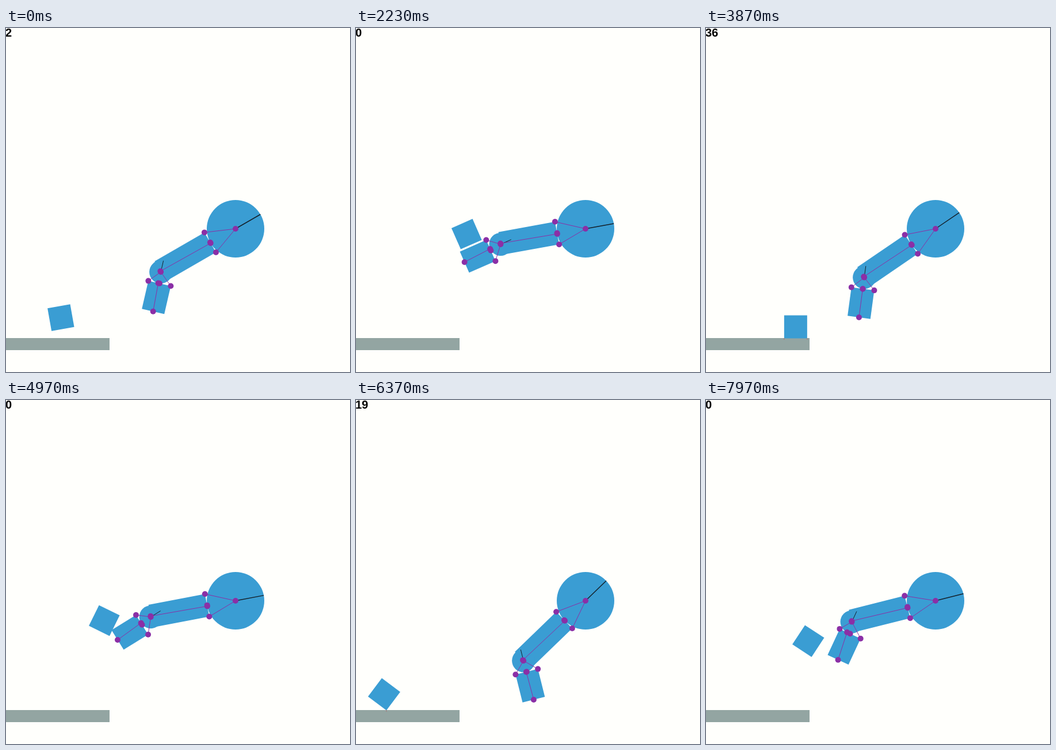
An HTML page with a canvas for the animation above (8 s loop, 598 by 598 pixels).

```html
<!DOCTYPE html>
<html lang="en">
<head>
<meta charset="utf-8">
<title>Two-link arm and cube</title>
<style>
  html, body { margin: 0; width: 100%; height: 100%; overflow: hidden; background: #fffffc; }
  canvas { display: block; }
</style>
</head>
<body>
<canvas id="stage" width="598" height="598"></canvas>
<script>
const ctx = document.getElementById('stage').getContext('2d');
const LOOP = 8000, FLOOR = 539, SHOULDER = { x: 399, y: 349 };
const GRAVITY = 1200, SLIDE = 450, TICK = 1000 / 30;
const BLUE = '#3a9dd3', PURPLE = '#8b2fa6', DARK = '#14202a';
const rad = degrees => degrees * Math.PI / 180;
const mix = (a, b, u) => a + (b - a) * u;

// Each round the arm droops from level, the cube slips off it, lands, may hop, and comes to rest.
const rounds = [
  { start: -1300,
    arm: { limit: 60, time: 1704, power: 1.353 },
    fore: { limit: 110, time: 1153, power: 1.542 },
    slip: -700, land: { t: -215, x: 144.5, turn: -102 }, hop: 315,
    rest: { x: 15.6, turn: -90, settle: 400 } },
  { start: 1535,
    arm: { limit: 60, time: 2665, power: 1.241 },
    fore: { limit: 83, time: 1142, power: 2.2 },
    slip: 2300, land: { t: 2720, x: 166, turn: -78 }, hop: 0,
    rest: { x: 155, turn: -90, settle: 120 } },
  { start: 4170,
    arm: { limit: 60, time: 1896, power: 1.876 },
    fore: { limit: 110, time: 1330, power: 2.122 },
    slip: 4800, land: { t: 5250, x: 136, turn: -91 }, hop: 545,
    rest: { x: 41, turn: -180, settle: 1340 } },
  { start: 7236,
    arm: { limit: 60, time: 1880, power: 1.4 },
    fore: { limit: 110, time: 772, power: 2.2 },
    slip: 7600, land: { t: 8145, x: 171, turn: -61 }, hop: 0,
    rest: { x: 160, turn: -90, settle: 120 } }
];

const droop = ({ limit, time, power }, age) =>
  limit * (1 - Math.exp(-Math.pow(Math.max(0, age) / time, power)));

// A point "along" a link and "side" pixels across it, upwards positive.
function onLink(joint, angle, along, side = 0) {
  const c = Math.cos(angle), s = Math.sin(angle);
  return { x: joint.x - c * along - s * side, y: joint.y + s * along - c * side };
}

function armPose(round, t) {
  const age = t - round.start;
  const arm = rad(droop(round.arm, age)), fore = rad(droop(round.fore, age));
  const speed = (droop(round.fore, age + 10) - droop(round.fore, age)) * 100;
  return { arm, fore, elbow: onLink(SHOULDER, arm, 150), sag: -0.05 * speed };
}

// Height of the centre of a cube that touches the floor
const floorY = turn =>
  FLOOR + 0.5 - 20 * (Math.abs(Math.cos(rad(turn))) + Math.abs(Math.sin(rad(turn))));

function cubePose(round, t) {
  const { slip, land, hop, rest } = round;
  if (t < land.t) {
    const { elbow, fore } = armPose(round, Math.min(t, slip));
    const carried = onLink(elbow, fore, 47, 40);
    carried.turn = -fore * 180 / Math.PI;
    if (t < slip) return carried;

    const u = (t - slip) / (land.t - slip), fallTime = (land.t - slip) / 1000;
    const bend = GRAVITY / 2 * fallTime ** 2 * u * (1 - u);
    return {
      x: mix(carried.x, land.x, u),
      y: mix(carried.y, floorY(land.turn), u) - bend,
      turn: mix(carried.turn, land.turn, 1 - (1 - u) ** 2)
    };
  }
  const since = t - land.t;
  const turn = mix(land.turn, rest.turn, Math.min(1, since / rest.settle) ** 3);
  const lift = GRAVITY / 2 * since * Math.max(0, hop - since) / 1e6;
  return { x: mix(rest.x, land.x, Math.exp(-since / SLIDE)), y: floorY(turn) - lift, turn };
}

// Two ticks for the landing, then one for every tick on the floor
function contactCount({ land, hop }, t) {
  return t < land.t ? 0 : 2 + Math.floor(Math.max(0, t - land.t - hop) / TICK);
}

function polygon(points, color) {
  ctx.fillStyle = color;
  ctx.beginPath();
  points.forEach(p => ctx.lineTo(p.x, p.y));
  ctx.fill();
}

function disc(p, radius, color) {
  ctx.fillStyle = color;
  ctx.beginPath();
  ctx.arc(p.x, p.y, radius, 0, 2 * Math.PI);
  ctx.fill();
}

function line(a, b, color, width = 1) {
  ctx.strokeStyle = color;
  ctx.lineWidth = width;
  ctx.beginPath();
  ctx.moveTo(a.x, a.y);
  ctx.lineTo(b.x, b.y);
  ctx.stroke();
}

function makeLink(joint, angle, radius, length, shift) {
  const at = (along, side) => onLink(joint, angle, along, side);
  const end = radius + length;
  return {
    joint, radius,
    near: [at(radius, shift + 20), at(radius, shift - 20)],
    far: [at(end, shift - 20), at(end, shift + 20)],
    anchor: at(radius, 0), head: at(radius, shift), tail: at(end, shift),
    pointer: at(-radius, 0)
  };
}

function drawArm({ arm, fore, elbow, sag }) {
  const links = [makeLink(SHOULDER, arm, 50, 100, 1.5), makeLink(elbow, fore, 20, 50, sag)];
  for (const { joint, radius, near, far } of links) {
    polygon([...near, ...far], BLUE);
    disc(joint, radius, BLUE);
  }
  for (const { joint, radius, pointer } of links)
    line(joint, pointer, DARK, radius > 20 ? 1.5 : 1);
  for (const { joint, near, anchor, head, tail } of links) {
    near.forEach(corner => line(joint, corner, PURPLE));
    line(anchor, tail, PURPLE);
    [joint, ...near, anchor, head, tail].forEach(p => disc(p, 5, PURPLE));
  }
}

function drawCube({ x, y, turn }) {
  const c = 20 * Math.cos(rad(turn)), s = 20 * Math.sin(rad(turn));
  const corners = [[-1, -1], [1, -1], [1, 1], [-1, 1]]
    .map(([i, j]) => ({ x: x + i * c - j * s, y: y + i * s + j * c }));
  polygon(corners, BLUE);
  // Contact marks
  corners.filter(p => p.y > FLOOR)
    .forEach(p => line({ x: p.x, y: FLOOR }, { x: p.x, y: FLOOR + 3 }, '#a87876'));
}

function draw(t) {
  const round = rounds.filter(r => r.start <= t).pop();
  ctx.fillStyle = '#fffffc';
  ctx.fillRect(0, 0, 598, 598);
  ctx.fillStyle = '#93a5a2';
  ctx.fillRect(0, FLOOR, 180, 21);
  drawCube(cubePose(round, t));
  drawArm(armPose(round, t));
  ctx.fillStyle = '#000';
  ctx.font = 'bold 20px "Liberation Sans", Arial, sans-serif';
  ctx.fillText(contactCount(round, t), -1, 15);
}

const origin = performance.now();
function frame() {
  draw((performance.now() - origin) % LOOP);
  requestAnimationFrame(frame);
}
frame();
</script>
</body>
</html>
```
